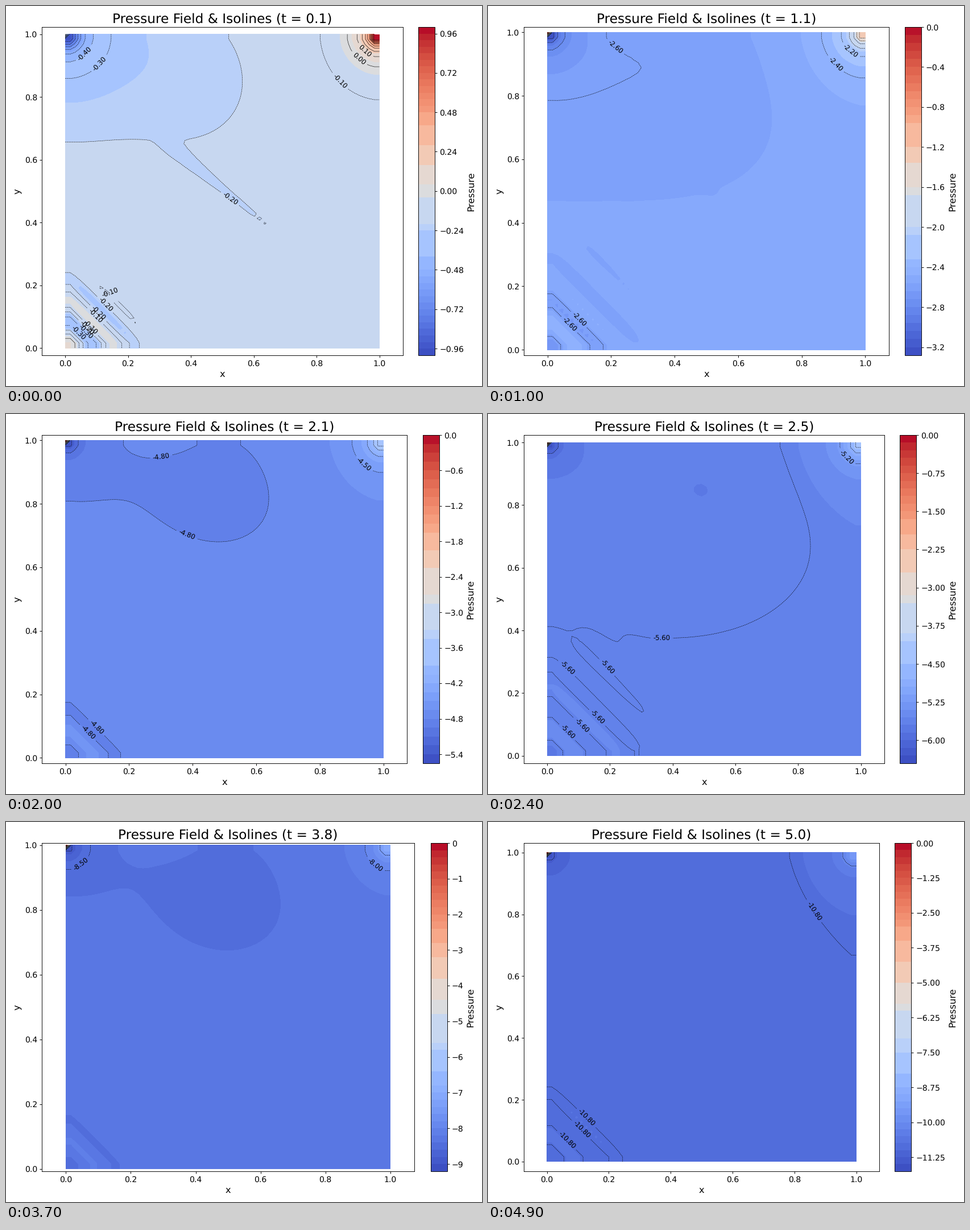
Recreate the animation shown at these times as a matplotlib script. Size 837x669 px, loop 5 s.

```python
import numpy as np
import matplotlib.pyplot as plt
from matplotlib.animation import FuncAnimation
from matplotlib.colors import ListedColormap

plt.rcParams["text.hinting"] = "none"

FRAMES, INTERVAL = 50, 100
N = 64
HALF_WIDTH = 0.5743
# Limits of the wide colour steps around the middle of the map
STEP_EDGES = [.257, .30, .37, .395, .488, .512, .583, .645, .697, .744]


def stepped_coolwarm():
    pos = np.linspace(0, 1, 256)
    shade = pos.copy()
    for start, end in zip(STEP_EDGES, STEP_EDGES[1:]):
        shade[(pos >= start) & (pos < end)] = start + .3 * (end - start)
    return ListedColormap(plt.get_cmap("coolwarm")(shade))


def smoothstep(t, start, end):
    u = np.clip((t - start) / (end - start), 0, 1)
    return u * u * (3 - 2 * u)


CMAP = stepped_coolwarm()
axis = np.linspace(0, 1, N)
X, Y = np.meshgrid(axis, axis)
dx = axis[1]
# Zero normal gradient at the walls
x, y = np.clip(X, dx, 1 - dx), np.clip(Y, dx, 1 - dx)
r_left = np.hypot(x, 1 - y)
r_right = np.hypot(1 - x, 1 - y)


def bell(cx, cy, wx, wy):
    return np.exp(-((x - cx) / wx) ** 2 - ((y - cy) / wy) ** 2)


def ripples(wavelength=.14, reach=.26):
    """Fading waves that leave the lower left corner along the diagonal."""
    s = x + y - 2 * dx
    envelope = np.exp(-(s / reach) ** 2 - ((x - y) / .25) ** 4)
    return np.cos(2 * np.pi * s / wavelength) * envelope


def streak():
    """Thin diagonal trough left by the start-up transient."""
    along = .78 * (x - .51) - .63 * (y - .5)
    across = .63 * (x - .51) + .78 * (y - .5)
    return np.exp(-(along / .25) ** 8 - (across / .02) ** 2)


def pressure(t):
    start = np.exp(-(t - .1) / .3)  # start-up transient, fades from 1
    mean = -.419 - 2.079 * t + .497 * np.exp(-(t - .1) / .93)
    peak = (.036 - .017 * start) * np.exp(-r_right / .336) / np.hypot(r_right, .016)
    peak += .00025 * start / r_right ** 2
    sink = (.012 + .012 * start) / r_left + .00014 * (1 - start) / r_left ** 2
    depth = .05 + .065 * smoothstep(t, 1.6, 2.5)
    vortex = depth * bell(.55 - .1 * start, .85, .35 - .1 * start, .3 - .05 * start)
    lid = .03 * (1 - start) * bell(.27, 1, .13, .05)

    p = mean + peak - sink - vortex + lid
    p -= (.15 - .35 * start) * ripples() + .05 * start * streak()
    p = np.maximum(p, mean - .735 - .115 * start)
    p[-1, 0] = 0  # pinned reference value
    return p


fig = plt.figure(figsize=(10, 7.993), dpi=83.7)


def draw(frame):
    t = (frame + 1) / 10
    p = pressure(t)
    fig.clear()
    ax = fig.add_subplot()
    fill = ax.contourf(X, Y, p, levels=50, cmap=CMAP)
    bar = fig.colorbar(fill, ax=ax, fraction=.046, pad=.04)
    bar.set_label("Pressure", fontsize=14)
    bar.ax.tick_params(labelsize=12)

    ax.set_title(f"Pressure Field & Isolines (t = {t:.1f})", fontsize=20)
    ax.set_xlabel("x", fontsize=14)
    ax.set_ylabel("y", fontsize=14)
    ax.tick_params(labelsize=12)
    ax.set_xlim(.5 - HALF_WIDTH, .5 + HALF_WIDTH)
    ax.set_ylim(-.02, 1.02)
    fig.tight_layout()
    # Same scale on both axes
    box = ax.get_window_extent()
    half = HALF_WIDTH * box.height / box.width
    ax.set_ylim(.5 - half, .5 + half)

    lines = ax.contour(X, Y, p, levels=20, colors="black", linewidths=.5)
    ax.clabel(lines, inline=True, fontsize=10, fmt="%.2f")
    return []


anim = FuncAnimation(fig, draw, frames=FRAMES, init_func=lambda: [],
                     interval=INTERVAL, repeat=True, repeat_delay=0)
plt.show()
```
